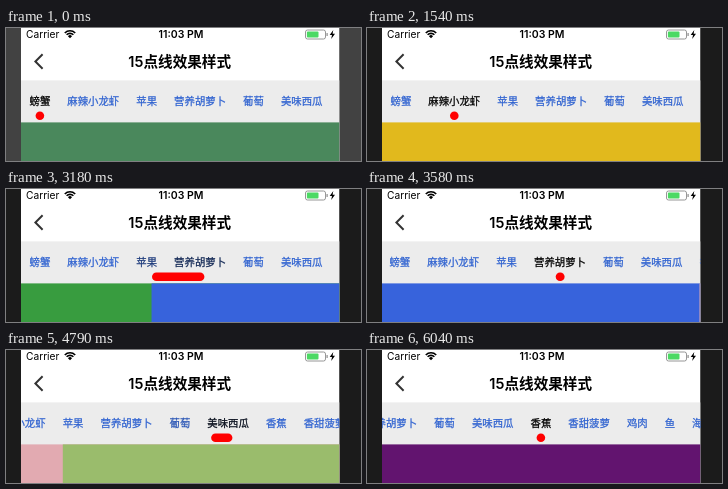
Animation, 355 px wide and 133 px high, one loop 6520 ms. Source, as an HTML page with a canvas:

```html
<!DOCTYPE html>
<html lang="zh-CN">
<head>
<meta charset="utf-8">
<title>15点线效果样式</title>
<style>
  html, body { margin: 0; width: 100%; height: 100%; overflow: hidden; background: #1b1b1b; }
  canvas { display: block; width: 355px; height: 133px; }
</style>
</head>
<body>
<canvas id="stage"></canvas>
<script>
const W = 355, H = 133, LOOP = 6520;
const LEFT = 15, RIGHT = 333.5, PAGE_W = RIGHT - LEFT, MID = 173.9;
const BAR_TOP = 52.4, PAGE_TOP = 94.4;
const CHAR = 10.4, GAP = 17, DOT_R = 4.3, DOT_Y = 87.8;
const FONTS = 'Inter, "Noto Sans CJK SC", "Noto Sans CJK", sans-serif';
const LINK = [47, 98, 208];
const PAGE_COLORS = ['#4a885c', '#e1b91d', '#389c3f', '#3763dc', '#e2aab1', '#9abc6c', '#62146f'];

let nextX = 23.5;
const tabs = ['螃蟹', '麻辣小龙虾', '苹果', '营养胡萝卜', '葡萄', '美味西瓜', '香蕉', '香甜菠萝', '鸡肉', '鱼', '海鲜']
  .map(label => {
    const x = nextX, width = label.length * CHAR;
    nextX += width + GAP;
    return { label, x, center: x + width / 2 };
  });

// The screen refreshes in bursts: start time, number of refreshes.
const TICK = 57.3;
const bursts = [[780, 3], [1190, 7], [1960, 2], [2260, 6], [2890, 2], [3180, 24], [4670, 25]];

const drag = u => u;
const settle = u => 1 - (1 - u) ** 3;
const glide = u => u < 0.5 ? 2 * u * u : 1 - 2 * (1 - u) ** 2;

// Each move: start, end, value before, value after, easing.
const pageMoves = [
  [723, 894, 0, 0.235, drag], [1133, 1533, 0.235, 1, settle],
  [1903, 2017, 1, 1.354, drag], [2203, 2546, 1.354, 2, settle],
  [2833, 2947, 2, 2.35, drag], [3123, 3523, 2.35, 3, settle],
  [3580, 3702, 3, 3.35, drag], [3702, 4102, 3.35, 4, settle],
  [4385, 4497, 4, 4.295, drag], [4613, 5013, 4.295, 5, settle],
  [5185, 5300, 5, 5.335, drag], [5300, 5700, 5.335, 6, settle]
];
const centered = i => Math.max(0, tabs[i].center - MID);
const scrollMoves = [[3523, 3], [4100, 4], [5013, 5], [5690, 6]]
  .map(([start, i]) => [start, start + 350, centered(i - 1), centered(i), glide]);

const canvas = document.getElementById('stage');
const ctx = canvas.getContext('2d');
const ratio = window.devicePixelRatio || 1;
canvas.width = Math.round(W * ratio);
canvas.height = Math.round(H * ratio);

const lerp = (a, b, u) => a + (b - a) * u;
const clamp = u => Math.min(1, Math.max(0, u));

function refreshTime(t) {
  const burst = bursts.filter(([start]) => start <= t).pop();
  if (!burst) return 0;
  const [start, count] = burst;
  return start + TICK * Math.min(count - 1, Math.floor((t - start + 8) / TICK));
}

function valueAt(moves, t) {
  const [start, end, from, to, ease] = moves.filter(m => m[0] <= t).pop() || moves[0];
  return lerp(from, to, ease(clamp((t - start) / (end - start))));
}

function rect(x, y, w, h, color) {
  ctx.fillStyle = color;
  ctx.fillRect(x, y, w, h);
}

function text(label, x, y, size, weight, color, align = 'left') {
  ctx.font = `${weight} ${size}px ${FONTS}`;
  ctx.textAlign = align;
  ctx.fillStyle = color;
  ctx.fillText(label, x, y);
}

function pathOf(points) {
  ctx.beginPath();
  points.forEach(([x, y]) => ctx.lineTo(x, y));
}

function pill(x, y, w, h, r) {
  ctx.beginPath();
  ctx.roundRect(x, y, w, h, r);
}

function drawWifi() {
  const x = 64, y = 10.2, spread = Math.PI / 4;
  ctx.strokeStyle = ctx.fillStyle = '#000';
  ctx.lineWidth = 1.6;
  for (const r of [7.4, 4.8]) {
    ctx.beginPath();
    ctx.arc(x, y, r, -Math.PI / 2 - spread, -Math.PI / 2 + spread);
    ctx.stroke();
  }
  ctx.beginPath();
  ctx.moveTo(x, y);
  ctx.arc(x, y, 2.9, -Math.PI / 2 - spread, -Math.PI / 2 + spread);
  ctx.fill();
}

function drawBattery() {
  ctx.strokeStyle = '#8c8c8c';
  ctx.lineWidth = 0.9;
  pill(299.5, 2, 20, 9, 2);
  ctx.stroke();
  ctx.fillStyle = '#4cd964';
  pill(300.9, 3.4, 11.6, 6.2, 1);
  ctx.fill();
  rect(320.5, 5, 1.2, 3, '#8c8c8c');
  pathOf([[327.3, 2], [323.7, 7], [326, 7], [325.2, 11], [329, 5.7], [326.6, 5.7]]);
  ctx.fillStyle = '#000';
  ctx.fill();
}

function drawHeader() {
  text('Carrier', 20, 10, 10.2, 400, '#000');
  drawWifi();
  text('11:03 PM', 175, 10, 10.5, 600, '#000', 'center');
  drawBattery();
  pathOf([[36.6, 26.3], [29.4, 33.5], [36.6, 40.7]]);
  ctx.strokeStyle = '#333';
  ctx.lineWidth = 2;
  ctx.stroke();
  text('15点线效果样式', MID - 0.2, 39.3, 14.6, 600, '#000', 'center');
}

function drawPages(page) {
  const i = Math.floor(page);
  const edge = RIGHT - (page - i) * PAGE_W;
  rect(LEFT, PAGE_TOP, PAGE_W, H - PAGE_TOP, PAGE_COLORS[i]);
  if (edge < RIGHT) rect(edge, PAGE_TOP, RIGHT - edge, H - PAGE_TOP, PAGE_COLORS[i + 1]);
}

function drawTabs(page, scroll) {
  ctx.lineWidth = 0.25;
  tabs.forEach(({ label, x }, i) => {
    const away = clamp(Math.abs(page - i));
    const color = `rgb(${LINK.map(c => Math.round(c * away))})`;
    text(label, x - scroll, 77.4, CHAR, 400, color);
    // A hairline outline gives the labels a medium weight.
    ctx.strokeStyle = color;
    ctx.strokeText(label, x - scroll, 77.4);
  });

  // The front edge travels in the first half of a swipe, the rear edge in the second.
  const i = Math.floor(page), u = page - i;
  const from = tabs[i].center - scroll, to = tabs[i + 1].center - scroll;
  const rear = lerp(from, to, clamp(2 * u - 1)) - DOT_R;
  const front = lerp(from, to, clamp(2 * u)) + DOT_R;
  ctx.fillStyle = '#f00';
  pill(rear, DOT_Y - DOT_R, front - rear, 2 * DOT_R, DOT_R);
  ctx.fill();
}

function draw(time) {
  const t = refreshTime(time);
  const page = valueAt(pageMoves, t);
  ctx.setTransform(canvas.width / W, 0, 0, canvas.height / H, 0, 0);
  rect(0, 0, W, H, time < 780 ? '#424242' : '#1b1b1b');
  ctx.save();
  ctx.beginPath();
  ctx.rect(LEFT, 0, PAGE_W, H);
  ctx.clip();
  rect(LEFT, 0, PAGE_W, H, '#fff');
  rect(LEFT, BAR_TOP, PAGE_W, H - BAR_TOP, '#ececec');
  drawHeader();
  drawTabs(page, valueAt(scrollMoves, t));
  drawPages(page);
  ctx.restore();
}

const began = performance.now();
function frame() {
  draw((performance.now() - began) % LOOP);
  requestAnimationFrame(frame);
}
frame();
</script>
</body>
</html>
```
